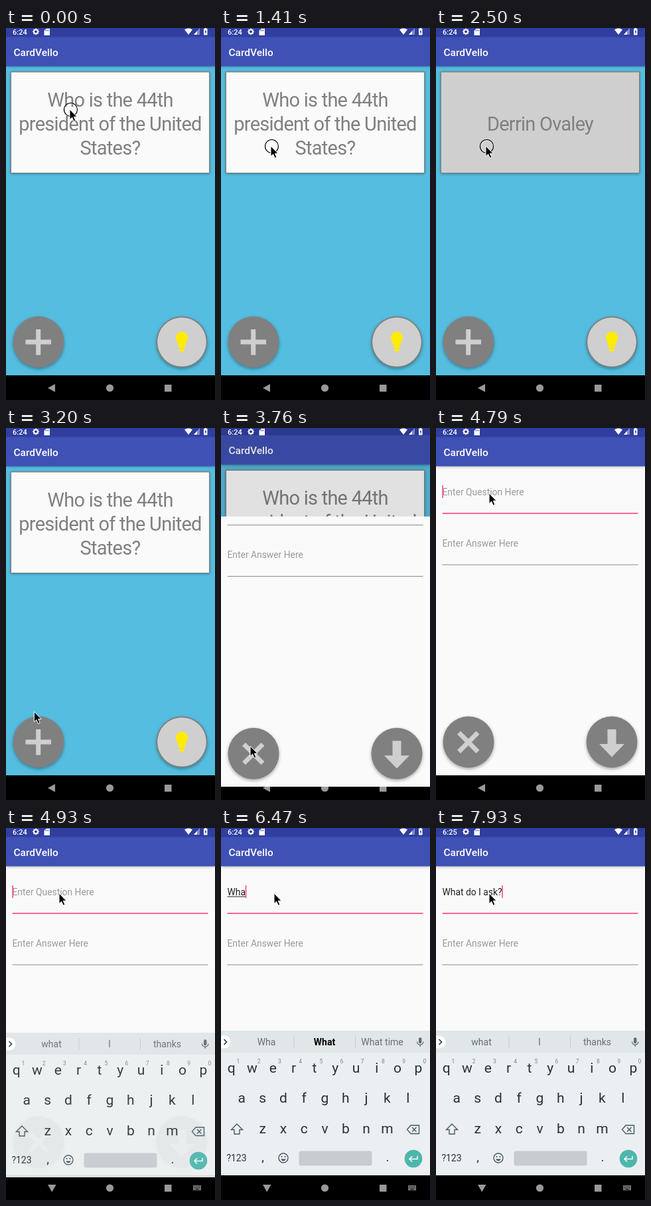
These frames come from a looping animation (315x558 px, 8 s). An HTML page with a canvas:

```html
<!DOCTYPE html>
<html lang="en">
<head>
<meta charset="utf-8">
<title>Flashcards</title>
<style>
  html, body { margin: 0; overflow: hidden; background: #000; }
  canvas { display: block; width: 315px; height: 558px; }
</style>
</head>
<body>
<canvas id="stage" width="315" height="558"></canvas>
<script>
const LOOP = 8000;
const ctx = document.getElementById('stage').getContext('2d');
const GREY = '#808080', LIGHT = '#cfcfcf', PAPER = '#fafafa', PINK = '#ff4081', KEY = '#263238';

const clamp = v => Math.max(0, Math.min(1, v));
const smooth = p => p * p * (3 - 2 * p);
const progress = (t, start, length) => clamp((t - start) / length);
const lastBefore = (list, t) => list.filter(item => item[0] <= t).pop();

// time, x, y of the pointer tip
const pointerPath = [
  [0, 96, 122], [410, 96, 122], [820, 74, 179], [1080, 74, 179], [1081, 75, 177], [2880, 75, 177],
  [3300, 37, 466], [3430, 44, 477], [3840, 44, 477], [4270, 91, 60], [4490, 80, 98], [LOOP, 80, 98]
];
const clicks = [[0, 60], [1410, 1580], [2500, 2670], [3700, 3730], [4520, 4620]];

const typed = 'What do I ask?';
const typedAt = [6210, 6340, 6470, 6530, 6610, 6690, 6760, 6830, 7120, 7330, 7380, 7420, 7570, 7930];
const suggestions = [
  [0, 'what', 'I', 'thanks'], [6210, 'W', 'What', 'We'], [6340, 'Wh', 'What', 'Where'],
  [6470, 'Wha', 'What', 'What time'], [6530, 'Whats', 'What', 'What time'], [6610, 'is', 'are', 'do'],
  [6690, 'd', 'do', 'did'], [6760, 'dont', 'do', 'does'], [6830, 'you', 'I', 'we'],
  [7120, 'in', 'I', 'I\'m'], [7330, 'do', 'have', 'need'], [7380, 'a', 'and', 'am'],
  [7420, 'as', 'as', 'ask'], [7570, 'asks', 'ask', 'asking'], [7930, 'what', 'I', 'thanks']
];

function rect(x, y, w, h, color) {
  ctx.fillStyle = color;
  ctx.fillRect(x, y, w, h);
}

function text(str, x, y, size, color, align = 'left', style = '') {
  ctx.font = `${style} ${size}px Roboto, sans-serif`;
  ctx.textAlign = align;
  ctx.fillStyle = color;
  ctx.fillText(str, x, y);
}

function shape(d, fill, stroke, width = 1) {
  const path = new Path2D(d);
  if (fill) { ctx.fillStyle = fill; ctx.fill(path); }
  if (stroke) { ctx.strokeStyle = stroke; ctx.lineWidth = width; ctx.stroke(path); }
}

function circle(x, y, r, fill, stroke, width = 1) {
  ctx.beginPath();
  ctx.arc(x, y, r, 0, 7);
  if (fill) { ctx.fillStyle = fill; ctx.fill(); }
  if (stroke) { ctx.strokeStyle = stroke; ctx.lineWidth = width; ctx.stroke(); }
}

function shadowed(blur, offset, draw) {
  ctx.save();
  ctx.shadowColor = 'rgba(0,0,0,.35)';
  ctx.shadowBlur = blur;
  ctx.shadowOffsetY = offset;
  draw();
  ctx.restore();
}

function toolbar() {
  shadowed(4, 1, () => rect(0, 0, 315, 57.4, '#3f51b5'));
  rect(0, 0, 315, 13.5, '#303f9f');
  text('CardVello', 11.5, 42, 15.5, '#fff', 'left', '500');
}

function fab(x, fill) {
  shadowed(5, 2, () => circle(x, 471, 38.5, GREY));
  if (fill) circle(x, 471, 36.8, fill);
}

function cardScreen(answer) {
  rect(0, 0, 315, 521, '#55bee0');
  toolbar();
  shadowed(4, 1, () => rect(6.7, 65.2, 300.6, 152.8, GREY));
  rect(8, 66.5, 298, 150.5, answer ? LIGHT : PAPER);
  const lines = answer ? ['', 'Derrin Ovaley'] : ['Who is the 44th', 'president of the United', 'States?'];
  ctx.letterSpacing = '-0.75px';
  lines.forEach((line, i) => text(line, 157, 117.5 + 36 * i, 29, GREY, 'center'));
  ctx.letterSpacing = '0px';
  fab(49);
  shape('M29.5 471H68M48.7 452V490.5', null, LIGHT, 7);
  fab(265, LIGHT);
  shape('M265 455.5C270.5 455.5 274 460 274 464.5C274 470 269.5 472 269.5 480H260.5C260.5 472 256 470 256 464.5C256 460 259.5 455.5 265 455.5ZM261 481.5H269V483.5L267 486H263L261 483.5Z', '#ffeb00');
}

function addScreen(t) {
  rect(0, 0, 315, 521, PAPER);
  toolbar();
  const count = typedAt.filter(time => time <= t).length;
  const entry = typed.slice(0, count);
  const focused = t >= 4600;
  if (entry) text(entry, 9.5, 101, 13.85, '#212121');
  else text('Enter Question Here', 9.5, 101, 13.85, '#9a9a9a');
  const caretX = 10 + (entry ? ctx.measureText(entry).width : 0);
  const wordStart = entry.lastIndexOf(' ') + 1;
  if (entry && /\w$/.test(entry)) {
    const x = 9.5 + ctx.measureText(entry.slice(0, wordStart)).width;
    rect(x, 102.5, caretX - x, 1, '#212121');
  }
  text('Enter Answer Here', 9.5, 178, 13.85, '#9a9a9a');
  if (focused) rect(9.5, 127.3, 295, 1.6, PINK);
  else rect(9.5, 127.6, 295, 1.1, '#949494');
  rect(9.5, 204.6, 295, 1.1, '#949494');
  if (focused && !(t >= 5230 && t < 5700)) rect(caretX - .7, 86, 1.5, 19, PINK);
  fab(49);
  shape('M34.5 457L63 485.5M63 457L34.5 485.5', null, LIGHT, 7);
  fab(265);
  shape('M258.5 452H271.5V474H284L265 493.5L246 474H258.5Z', LIGHT);
}

function keyRow(keys, x, y) {
  [...keys].forEach((key, i) => text(key, x + i * 31.3, y, 21, KEY, 'center'));
}

function keyboard(t) {
  rect(0, 304, 315, 217, '#eceff1');
  rect(0, 304, 315, 33, '#e1e6e8');
  const [, left, middle, right] = lastBefore(suggestions, t);
  const bold = /\w$/.test(typed.slice(0, typedAt.filter(time => time <= t).length));
  text(left, 68.5, 326, 14, '#667075', 'center');
  text(middle, 156, 326, 14, bold ? '#000' : '#667075', 'center', bold ? 'bold' : '');
  text(right, 243, 326, 14, '#667075', 'center');
  rect(109.5, 312, 1, 18, '#c3cacd');
  rect(202, 312, 1, 18, '#c3cacd');
  shape('M0 311.5H5A9.5 9.5 0 0 1 5 330.5H0Z', '#fff');
  shape('M4.5 317L8.5 321L4.5 325', null, KEY, 1.6);
  shape('M298 316.5A2.2 2.2 0 0 1 302.4 316.5V321A2.2 2.2 0 0 1 298 321Z', '#5f6b70');
  shape('M295.5 320.5A4.7 4.7 0 0 0 304.9 320.5M300.2 325V328', null, '#5f6b70', 1.3);

  keyRow('qwertyuiop', 15.7, 367);
  [...'1234567890'].forEach((n, i) => text(n, 26 + i * 31.2, 353, 8.5, '#78858b', 'center'));
  keyRow('asdfghjkl', 31.3, 412);
  keyRow('zxcvbnm', 62.6, 458);
  shape('M24 444L32.5 452.5H28V459H20V452.5H15.5Z', null, '#455a64', 1.4);
  shape('M286 446H298.5V458.5H286L280.5 452.2ZM288 449L294.5 455.5M294.5 449L288 455.5', null, '#455a64', 1.4);
  text('?123', 23.5, 500, 14, KEY, 'center');
  text(',', 63, 500, 19, KEY, 'center');
  text('.', 251, 500, 19, KEY, 'center');
  circle(94, 495, 7, null, '#455a64', 1.4);
  circle(91.5, 493, 1.1, '#455a64');
  circle(96.5, 493, 1.1, '#455a64');
  shape('M90 496.5Q94 502.5 98 496.5Z', '#455a64');
  ctx.beginPath();
  ctx.roundRect(117.5, 484.5, 110, 22, 3);
  ctx.fillStyle = '#c7ccd0';
  ctx.fill();
  circle(290, 496, 13.3, '#4db6ac');
  shape('M296 492V496.5H284M288 492.5L284 496.5L288 500.5', null, '#fff', 1.6);
}

function statusBar(t) {
  text(t < 7400 ? '6:24' : '6:25', 10, 10, 11, '#fff', 'left', '500');
  circle(45, 5.5, 3, null, '#fff', 2);
  for (let i = 0; i < 8; i++) {
    const a = i * Math.PI / 4;
    circle(45 + 4.3 * Math.cos(a), 5.5 + 4.3 * Math.sin(a), .8, '#fff');
  }
  shape('M60.5 1H66V11H57.5V4Z', '#fff');
  for (const x of [60, 62, 64]) rect(x - .4, 2.5, .9, 2.2, '#303f9f');
  shape('M269 2.5Q275 -1.5 281 2.5L275 10Z', '#fff');
  shape('M292 0V10H283Z', 'rgba(255,255,255,.4)');
  shape('M288 4.5V10H283Z', '#fff');
  shape('M299.5 0H302V1H303.5V10.5H298V1H299.5Z', '#fff');
  shape('M301.3 2.5L299.5 6H300.5V9L302.4 5.3H301.3Z', '#303f9f');
}

function navBar(keyboardOpen) {
  rect(0, 521, 315, 37, '#000');
  const color = '#999';
  shape(keyboardOpen ? 'M63 535H75.5L69.2 546Z' : 'M74 534V546L63 540Z', color);
  circle(156.5, 540, 5.6, color);
  rect(239, 535, 10.5, 10.5, color);
  if (!keyboardOpen) return;
  rect(282, 536, 12, 7.5, '#777');
  for (let i = 0; i < 8; i++) rect(283.5 + i % 4 * 2.5, 537.5 + (i >> 2) * 2, 1.2, 1, '#000');
  rect(285.5, 541.5, 5, 1, '#000');
}

function pointer(t) {
  const i = Math.max(1, pointerPath.findIndex(p => p[0] > t));
  const [t0, x0, y0] = pointerPath[i - 1], [t1, x1, y1] = pointerPath[i];
  const p = smooth(progress(t, t0, t1 - t0));
  const x = x0 + (x1 - x0) * p, y = y0 + (y1 - y0) * p;
  if (clicks.some(([from, to]) => t >= from && t < to)) {
    circle(x + 1.5, y + .5, 9, null, 'rgba(255,255,255,.6)', 1.5);
    circle(x + 1.5, y + .5, 10, null, '#000', 1.2);
  }
  ctx.save();
  ctx.translate(x, y);
  shape('M0 0V15.5L3.6 12.2L6.2 18L8.8 16.9L6.3 11.2H11Z', '#000', '#fff', 1);
  ctx.restore();
}

function render(t) {
  rect(0, 0, 315, 558, '#000');
  const opening = t >= 3730;
  const keyboardIn = progress(t, 4830, 160);
  const p = opening ? progress(t, 3625, 425) : 0;
  const shift = smooth(p);

  navBar(keyboardIn > 0);
  if (p < 1) {
    ctx.save();
    ctx.translate(0, -10.6 * shift);
    cardScreen(t >= 1560 && t < 2650);
    if (opening) rect(0, 0, 315, 532, 'rgba(0,0,0,.1)');
    ctx.restore();
  }
  if (opening) {
    ctx.save();
    ctx.translate(0, 22.9 * (1 - shift));
    ctx.beginPath();
    const top = 540 * (1 - p) ** 4;
    ctx.rect(0, top, 315, 521 - top);
    ctx.clip();
    addScreen(t);
    ctx.restore();
  }
  if (keyboardIn > 0) {
    ctx.save();
    ctx.globalAlpha = 1 - (1 - keyboardIn) ** 2.7;
    ctx.translate(0, 22 * (1 - keyboardIn) ** 2);
    keyboard(t);
    ctx.restore();
  }
  statusBar(t);
  pointer(t);
}

const start = performance.now();
(function tick() {
  render((performance.now() - start) % LOOP);
  requestAnimationFrame(tick);
})();
</script>
</body>
</html>
```
